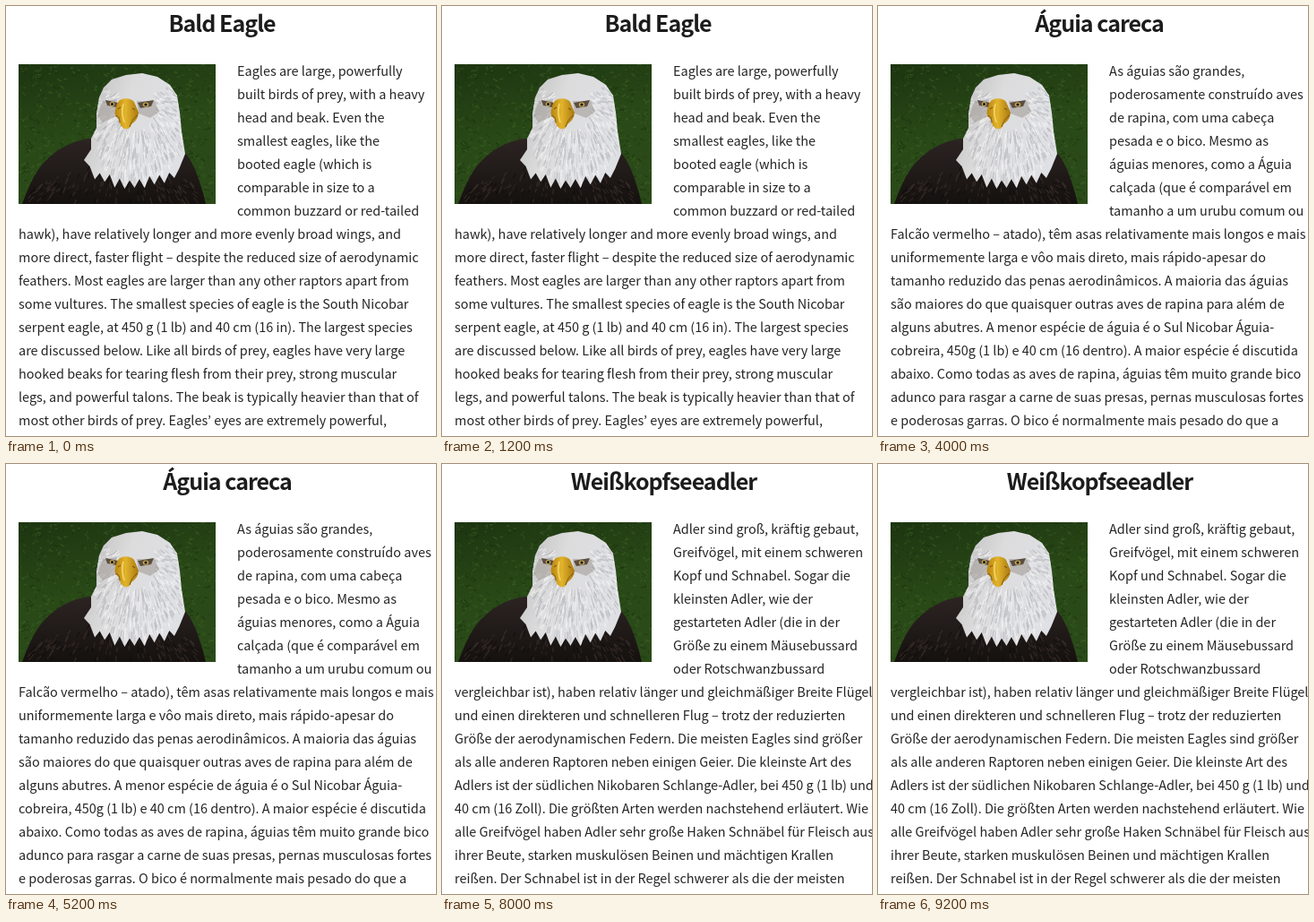
These frames come from a looping animation (480 by 480 pixels, 10000 ms). An HTML page:

```html
<!DOCTYPE html>
<html lang="en">
<head>
<meta charset="utf-8">
<title>Eagle article in five languages</title>
<style>
  html, body { margin: 0; width: 100%; height: 100%; overflow: hidden; background: #fff; }
  svg { position: absolute; left: 14px; top: 65px; }
  .page {
    position: absolute; inset: 0; overflow: hidden; contain: strict;
    color: #242424; font: 16px/26px "Noto Sans CJK JP", "Noto Sans CJK", "Noto Sans", sans-serif;
    font-feature-settings: "palt"; text-spacing-trim: space-all; visibility: hidden;
  }
  .page:lang(zh) { font-family: "Noto Sans CJK SC", "Noto Sans CJK", "Noto Sans", sans-serif; }
  .line, h1 { position: absolute; white-space: pre; margin: 0; }
  h1 { top: -3px; font-size: 28px; line-height: 40px; font-weight: 700; letter-spacing: -1px; color: #1c1c1c; transform: translateX(-50%); }
  .latin { font-size: .904em; line-height: 0; font-feature-settings: "palt", "pwid"; }
  h1 .latin { font-size: .895em; }
  .kana { letter-spacing: -.022em; }
  h1 .kana { letter-spacing: -.1em; }
  .comma { display: inline-block; width: 1em; text-align: center; }
  .dash { font-size: 13.1px; line-height: 0; }
</style>
</head>
<body>
<svg id="photo" width="220" height="156" viewBox="14 65 220 156">
  <defs>
    <linearGradient id="grass" x1="0" y1="0" x2=".3" y2="1">
      <stop offset="0" stop-color="#1d3511"/>
      <stop offset=".55" stop-color="#294917"/>
      <stop offset="1" stop-color="#2b4a19"/>
    </linearGradient>
    <linearGradient id="plumage" x1="0" y1="0" x2="0" y2="1">
      <stop offset="0" stop-color="#2c2422"/>
      <stop offset="1" stop-color="#15110f"/>
    </linearGradient>
    <linearGradient id="head" x1="0" y1="0" x2="1" y2=".4">
      <stop offset="0" stop-color="#bdbcbc"/>
      <stop offset=".45" stop-color="#dcdcdd"/>
      <stop offset="1" stop-color="#dfe0e4"/>
    </linearGradient>
    <linearGradient id="beak" x1="0" y1="0" x2="1" y2="0">
      <stop offset="0" stop-color="#b98410"/>
      <stop offset=".45" stop-color="#e2b42c"/>
      <stop offset="1" stop-color="#a9780f"/>
    </linearGradient>
    <clipPath id="headClip"><path id="headEdge"/></clipPath>
  </defs>
  <rect x="14" y="65" width="220" height="156" fill="url(#grass)"/>
  <g id="blades" fill="none"></g>
  <path fill="url(#plumage)" d="M18 221C24 205 31 187 43 174C55 161 72 151 92 148L194 158C205 166 215 187 223 221Z"/>
  <g id="wings" fill="none"></g>
  <path id="ruff" fill="url(#head)"/>
  <g id="feathers" fill="none" clip-path="url(#headClip)"></g>
  <path fill="#98928c" opacity=".5" d="M108 106L124 105L121 124L108 130L102 122ZM146 106L166 106L171 118L161 125L148 120Z"/>
  <path fill="#5b4e40" d="M111 105L125 108L123 113L113 111ZM147 108L165 105L162 112L150 114Z"/>
  <g fill="#c9ac52">
    <ellipse cx="118.500" cy="109.500" rx="2.700" ry="2.500"/>
    <ellipse cx="156" cy="110" rx="3.200" ry="2.600"/>
  </g>
  <circle cx="118.500" cy="109.500" r="1.500" fill="#11100e"/>
  <circle cx="156" cy="110" r="1.600" fill="#11100e"/>
  <path fill="url(#beak)" d="M125 107C129 102 139 102 143 107L148 119C147 127 143 130 140 132C139 136 136 138 133 137C129 136 127 132 126 127L122 122C121 117 123 111 125 107Z"/>
  <path fill="none" stroke="#775612" d="M122 123C125 122 127 125 127 130M147 122C142 125 140 129 138 135"/>
  <path fill="none" stroke="#efd05c" stroke-width="2" d="M131 109C129 116 130 124 132 130"/>
  <path stroke="#6a4b12" d="M125 115L128 113M141 114L144 116"/>
</svg>
<script>
const HOLD = 2000;

const articles = [
  { lang: "en", title: "Bald Eagle", center: 241, text: `Eagles are large, powerfully
built birds of prey, with a heavy
head and beak. Even the
smallest eagles, like the
booted eagle (which is
comparable in size to a
common buzzard or red-tailed
hawk), have relatively longer and more evenly broad wings, and
more direct, faster flight – despite the reduced size of aerodynamic
feathers. Most eagles are larger than any other raptors apart from
some vultures. The smallest species of eagle is the South Nicobar
serpent eagle, at 450 g (1 lb) and 40 cm (16 in). The largest species
are discussed below. Like all birds of prey, eagles have very large
hooked beaks for tearing flesh from their prey, strong muscular
legs, and powerful talons. The beak is typically heavier than that of
most other birds of prey. Eagles’ eyes are extremely powerful,` },
  { lang: "ja", title: "白頭ワシ", center: 247, text: `イーグルスは大きな獲物の鳥は、
重い頭とくちばしを持つがっしり
しています。 ヒメクマタカ (ノスリや
アカオノスリに匹敵するサイズで
ある) のような最小ワシも比較的
長くより均等に広い翼と空羽の縮
小にもかかわらず – より直接的よ
り速く飛行があります。 ほとんどのワシはいくつかのハゲタカから離れ
て他の猛禽類より大きいです。 ワシの最小種は南ニコバル蛇ワシの
450 グラム (1 ポンド) で、40 cm (16 インチ) です。 最大の種について以
下に説明します。 すべての獲物の鳥のようなワシはその獲物、強力な
筋肉の脚と強力な爪からの肉を引き裂くための非常に大規模なフック
くちばしがあります。 くちばしは通常ほとんど他の猛禽のより重いです。
ワシの目は非常に長い距離からスポットの潜在的な獲物にそれらを可
能ゴマバラワシの 3.6 倍人間の視力しなくて、非常に強力です。 この鋭
い視力は入射光の最小限の回折 （散乱） を確保する非常に大規模な` },
  { lang: "pt", title: "Águia careca", center: 247, text: `As águias são grandes,
poderosamente construído aves
de rapina, com uma cabeça
pesada e o bico. Mesmo as
águias menores, como a Águia
calçada (que é comparável em
tamanho a um urubu comum ou
Falcão vermelho – atado), têm asas relativamente mais longos e mais
uniformemente larga e vôo mais direto, mais rápido-apesar do
tamanho reduzido das penas aerodinâmicos. A maioria das águias
são maiores do que quaisquer outras aves de rapina para além de
alguns abutres. A menor espécie de águia é o Sul Nicobar Águia-
cobreira, 450g (1 lb) e 40 cm (16 dentro). A maior espécie é discutida
abaixo. Como todas as aves de rapina, águias têm muito grande bico
adunco para rasgar a carne de suas presas, pernas musculosas fortes
e poderosas garras. O bico é normalmente mais pesado do que a` },
  { lang: "zh", title: "秃头鹰", center: 247.5, text: `鹰是大，健壮的猛禽，用沉重
的头和嘴。 甚至最小的鹰，如引
导鹰 （这是一个普通鵟或红尾鵟
相媲美的大小），有相对更长和
更均匀广泛的翅膀，更直接、更
快的飞行 — — 尽管气动羽毛的
规模缩小。 大多数鹰都比任何其
他猛禽除了一些秃鹫。 鹰最小的物种是南尼蛇鹰，在 450 克 （1 磅）
和 40 厘米 （16 英寸）。 下文讨论了最大的品种。 像所有的猛禽鹰有
非常大的勾的喙，可以把肉从他们的猎物，强壮的肌肉腿和锋利的
爪子撕裂。 喙是猎物的通常更重，比大多数其他鸟。 鹰的眼睛是非
常强大，有 3.6 倍人类视力对于武术的雄鹰，使他们对现货潜在的
猎物从很远的距离。 这种敏锐的视力主要归因于他们极大的学生，
确保最小衍射 (散射) 的入射光。 所有已知物种的鹰女大于男。` },
  { lang: "de", title: "Weißkopfseeadler", center: 247.5, text: `Adler sind groß, kräftig gebaut,
Greifvögel, mit einem schweren
Kopf und Schnabel. Sogar die
kleinsten Adler, wie der
gestarteten Adler (die in der
Größe zu einem Mäusebussard
oder Rotschwanzbussard
vergleichbar ist), haben relativ länger und gleichmäßiger Breite Flügel
und einen direkteren und schnelleren Flug – trotz der reduzierten
Größe der aerodynamischen Federn. Die meisten Eagles sind größer
als alle anderen Raptoren neben einigen Geier. Die kleinste Art des
Adlers ist der südlichen Nikobaren Schlange-Adler, bei 450 g (1 lb) und
40 cm (16 Zoll). Die größten Arten werden nachstehend erläutert. Wie
alle Greifvögel haben Adler sehr große Haken Schnäbel für Fleisch aus
ihrer Beute, starken muskulösen Beinen und mächtigen Krallen
reißen. Der Schnabel ist in der Regel schwerer als die der meisten` },
];

// Each script has its own size or spacing; ideographs and other marks fall into the last group.
const runs = /(?<latin>[ -\u024f–’]+)|(?<kana>[\u3041-\u30ff]+)|(?<comma>，)|(?<dash>—)|[^ -\u024f–’\u3041-\u30ff，—]+/g;

function add(parent, tag, text, x, y) {
  const el = document.createElement(tag);
  for (const { 0: run, groups } of text.matchAll(runs)) {
    const span = document.createElement("span");
    span.className = Object.keys(groups).find(name => groups[name]) || "";
    span.textContent = run;
    el.append(span);
  }
  el.style.left = x + "px";
  if (tag === "div") {
    el.className = "line";
    el.style.top = y + "px";
  }
  parent.append(el);
}

const pages = articles.map(({ lang, title, center, text }) => {
  const page = document.createElement("div");
  page.className = "page";
  page.lang = lang;
  add(page, "h1", title, center);
  text.split("\n").forEach((line, i) => add(page, "div", line, i < 7 ? 258 : 14, 58 + 26 * i));
  document.body.append(page);
  return page;
});

let seed = 7;
const random = (min = 0, max = 1) => {
  seed = (seed * 16807) % 2147483647;
  return min + (max - min) * seed / 2147483647;
};

function strokes(id, count, colors, width, opacity, segment) {
  const paths = colors.map(() => "");
  for (let i = 0; i < count; i++) {
    const [x, y, dx, dy] = segment();
    paths[i % colors.length] += `M${x.toFixed(1)} ${y.toFixed(1)}l${dx.toFixed(1)} ${dy.toFixed(1)}`;
  }
  document.getElementById(id).innerHTML = paths.map((d, i) =>
    `<path d="${d}" stroke="${colors[i]}" stroke-width="${width}" opacity="${opacity}"/>`).join("");
}

strokes("blades", 1100, ["#42692a", "#17300e", "#385c1e", "#1f3a12"], 1.3, .55, () =>
  [random(12, 234), random(63, 221), random(-5, 5), random(-4, 3)]);

strokes("wings", 170, ["#463831", "#0d0b0a", "#3a2e29"], 1.2, .6, () => {
  const x = random(30, 212);
  return [x, random(162 + Math.abs(x - 125) * .42, 216), (x - 125) * .06, random(3, 8)];
});

// Crown and cheeks, then alternating feather tips along the ruff.
const ruff = [[87, 172], [95, 160], [95, 148], [101, 136], [101, 120], [104, 102], [109, 91],
  [118, 82], [134, 77], [152, 75], [169, 79], [183, 88], [191, 100], [194, 119], [196, 140], [200, 165]];
const tips = 20;
for (let i = 1; i < tips; i++) {
  const u = i / tips;
  const notch = i % 2 ? -7 : 3;
  ruff.push([199 - 111 * u, 178 + 22 * Math.sqrt(Math.sin(Math.PI * u)) + notch + random(-2, 2)]);
}
for (const id of ["ruff", "headEdge"]) {
  document.getElementById(id).setAttribute("d", "M" + ruff.join("L") + "Z");
}

strokes("feathers", 620, ["#fafafa", "#a9aab0", "#f2f2f3", "#c3c3c8"], 1.2, .6, () => {
  const angle = random(-.35, Math.PI + .35);
  const r = random(.35, 1);
  const length = random(5, 12);
  return [147 + Math.cos(angle) * r * 54, 108 + Math.sin(angle) * r * 88,
    Math.cos(angle) * length * .5, Math.abs(Math.sin(angle)) * length + 1];
});

const start = performance.now();
function draw() {
  const current = Math.floor((performance.now() - start) / HOLD) % pages.length;
  pages.forEach((page, i) => { page.style.visibility = i === current ? "visible" : "hidden"; });
  requestAnimationFrame(draw);
}
draw();
</script>
</body>
</html>
```
